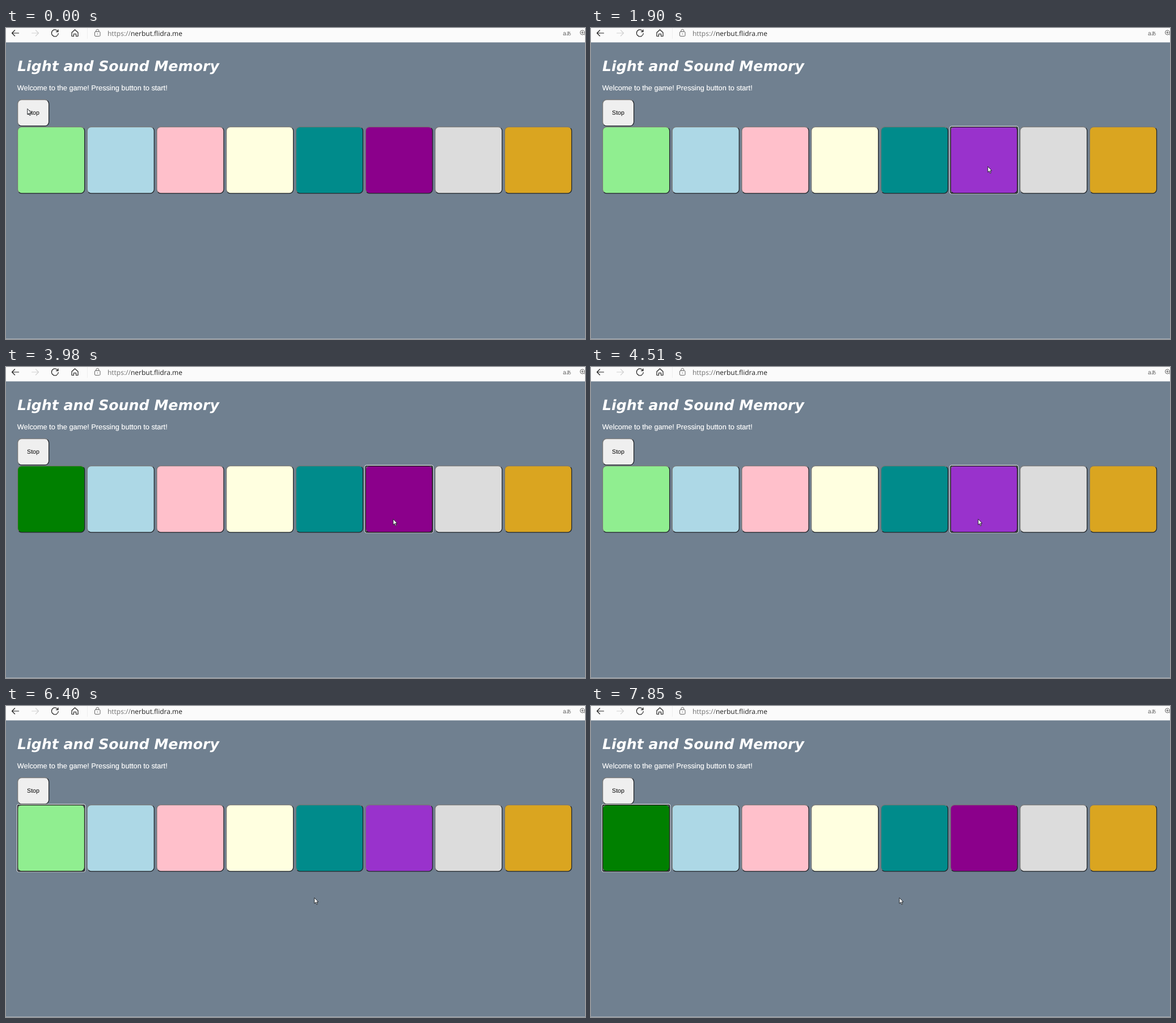
Write an HTML page that moves like this. It is 1021x549 px and loops after 8000 ms.

```html
<!DOCTYPE html>
<html lang="en">
<head>
<meta charset="utf-8">
<title>Light and Sound Memory</title>
<style>
  html, body { margin: 0; width: 100%; height: 100%; overflow: hidden; background: slategray; }
  svg { display: block; }
  text { font-family: "Liberation Sans", Arial, sans-serif; text-rendering: geometricPrecision; }
  .url { font: 12px "Open Sans", "Noto Sans", sans-serif; }
  .kana { font: 9px "Noto Sans CJK JP", "Noto Sans CJK", sans-serif; }
  .title { font: italic bold 25.2px "DejaVu Sans", Verdana, sans-serif; }
  .icon { fill: none; stroke: #222; stroke-width: 1.2; stroke-linecap: round; stroke-linejoin: round; }
  .button { stroke: url(#bevel); stroke-width: 1.3; }
</style>
</head>
<body>
<svg width="1021" height="549" viewBox="0 0 1021 549">
  <defs>
    <linearGradient id="bevel" x2="1" y2="1">
      <stop offset=".5" stop-color="#767676"/>
      <stop offset=".5" stop-color="#202428"/>
    </linearGradient>
  </defs>
  <rect width="1021" height="549" fill="slategray"/>
  <path d="M0 548.5H1021" stroke="#a3abb4"/>

  <!-- Browser toolbar -->
  <rect width="1021" height="25.4" fill="#fbfbfb"/>
  <path d="M143.5 0V19" stroke="#efefef"/>
  <g class="icon">
    <path d="M22.5 9H10.5M15.5 4L10.5 9L15.5 14"/>
    <path d="M45.5 9H57.5M52.5 4L57.5 9L52.5 14" stroke="#d2d2d2"/>
    <path d="M91.7 6.3A6 6 0 1 0 92.3 9.5M92 3V6.6H88.4"/>
    <path d="M116 8L121.5 3L127 8V14.5H123.5V10.5H119.5V14.5H116Z"/>
    <g stroke="#666" stroke-width="1">
      <rect x="156.5" y="6.5" width="9.5" height="8" rx="1.5"/>
      <path d="M158.8 6.5V5A2.5 2.5 0 0 1 163.8 5V6.5M161.2 10V11"/>
      <circle cx="1016.5" cy="8" r="4"/>
      <path d="M1014.5 8H1018.5M1016.5 6V10M1019.5 11L1022 13.5"/>
    </g>
  </g>
  <text class="url" x="179" y="14" fill="#707070">https://<tspan fill="#222">nerbut.flidra.me</tspan></text>
  <text x="982" y="13" fill="#666" font-size="10.5">a<tspan class="kana">あ</tspan></text>

  <!-- Page -->
  <text class="title" x="20" y="76" fill="#fff">Light and Sound Memory</text>
  <text x="19.8" y="110" fill="#fff" stroke="#fff" stroke-width=".2" font-size="12.72">Welcome to the game! Pressing button to start!</text>
  <rect class="button" x="20.6" y="126.7" width="55" height="46.2" rx="7" fill="#efefef"/>
  <text x="48" y="153" font-size="10.6" text-anchor="middle">Stop</text>
  <g id="pads"></g>
  <g id="ring" fill="none">
    <rect x="-1.1" y="-1.1" width="120.3" height="119.2" rx="2.5" stroke="#fff"/>
    <rect width="118.1" height="117.2" rx="2" stroke="#101010" stroke-width="1.3"/>
  </g>
  <path id="cursor" d="M.8 .5V10.6L3.1 8.5L4.8 12.4L6.4 11.7L4.7 7.9H7.9Z" fill="#fff" stroke="#15181c" stroke-width=".9" stroke-linejoin="round"/>
</svg>
<script>
const LOOP = 8000, STEP = 135;
const PITCH = 122.7, LEFT = 20.5, TOP = 174.6;
const GREEN = 0, PURPLE = 5;
const colors = ["lightgreen", "lightblue", "pink", "lightyellow", "darkcyan", "darkorchid", "gainsboro", "goldenrod"];

// Pads that light up: each toggle time flips the pad between its two colours.
const blinkers = [
  { pad: PURPLE, shades: ["darkmagenta", "darkorchid"], toggles: [690, 1510, 1900, 2150, 3100, 3980, 4510, 4780, 6400, 6680] },
  { pad: GREEN, shades: ["lightgreen", "green"], toggles: [3500, 4230, 5050, 5420, 7110, 7540, 7850] }
];

const home = { x: 37, y: 142 };
const moves = [
  { start: 0, end: 420, x: 217, y: 240 },
  { start: 420, end: 930, x: 346, y: 233 },
  { start: 930, end: 1360, x: 684, y: 242 },
  { start: 1660, end: 1780, x: 699, y: 244 },
  { start: 2150, end: 2420, x: 609, y: 337 },
  { start: 3500, end: 3860, x: 682, y: 268 },
  { start: 4640, end: 5050, x: 42, y: 245 },
  { start: 5420, end: 5540, x: 149, y: 270 },
  { start: 5540, end: 5690, x: 543, y: 338 }
];

const byId = id => document.getElementById(id);
const place = (node, x, y) => node.setAttribute("transform", `translate(${x} ${y})`);
const padX = index => LEFT + PITCH * index;
const smooth = p => p * p * (3 - 2 * p);

byId("pads").innerHTML = colors.map((color, i) =>
  `<rect class="button" x="${padX(i)}" y="${TOP}" width="118.1" height="117.2" rx="7" fill="${color}"/>`).join("");
const pads = byId("pads").children;

function pointerAt(time) {
  let { x, y } = home;
  for (const move of moves) {
    if (time < move.start) break;
    const steps = Math.round((move.end - move.start) / STEP);
    const progress = Math.min(1, (time - move.start) / (move.end - move.start));
    const eased = smooth(Math.floor(progress * steps) / steps);
    x += (move.x - x) * eased;
    y += (move.y - y) * eased;
  }
  return [x, y];
}

function draw(now) {
  const time = now % LOOP;
  for (const { pad, shades, toggles } of blinkers) {
    const flips = toggles.filter(toggle => toggle <= time).length;
    pads[pad].setAttribute("fill", shades[flips % 2]);
  }
  byId("ring").setAttribute("visibility", time < 1660 ? "hidden" : "visible");
  place(byId("ring"), padX(time < 5170 ? PURPLE : GREEN), TOP);
  place(byId("cursor"), ...pointerAt(time));
  requestAnimationFrame(draw);
}
draw(0);
</script>
</body>
</html>
```
